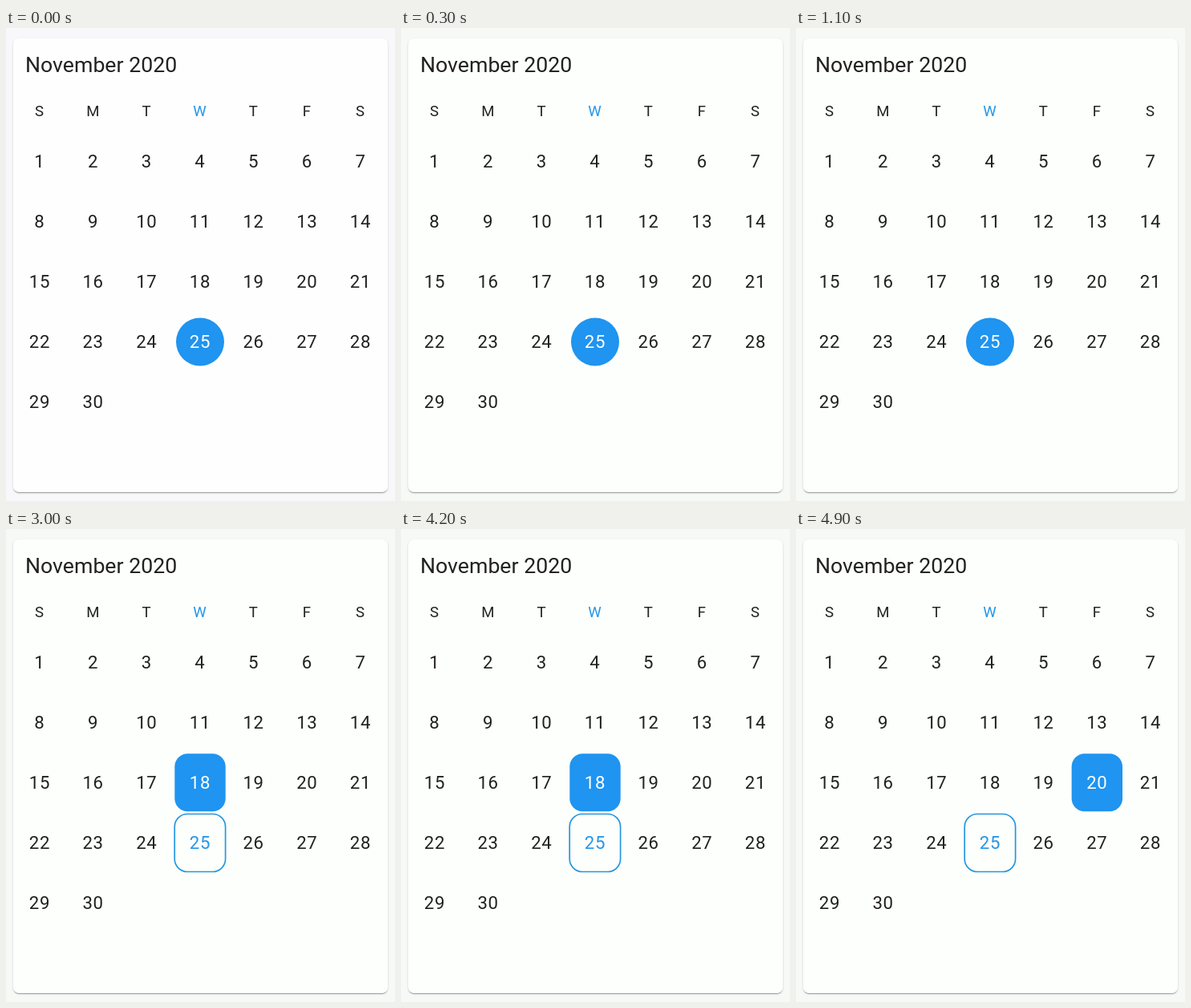
Animation, 485 px wide and 590 px high, one loop 5000 ms. Source, as an HTML page:

```html
<!DOCTYPE html>
<html lang="en">
<head>
<meta charset="utf-8">
<title>Calendar</title>
<style>
  html, body { margin: 0; width: 100%; height: 100%; overflow: hidden; }
  body { background: var(--page); }
  .card {
    position: absolute; left: 9px; top: 12.5px; width: 466.5px; height: 566px;
    border-radius: 7px; background: var(--card);
    box-shadow: 0 2px 1px -1px rgba(0,0,0,.2), 0 1px 1px rgba(0,0,0,.14), 0 1px 3px rgba(0,0,0,.12);
  }
  svg { position: absolute; left: 0; top: 0; }
  text { font-family: Roboto, sans-serif; fill: #212121; }
  .title { font-size: 26.7px; }
  .mid { text-anchor: middle; }
  .week { font-size: 18.6px; }
  .day { font-size: 22.2px; letter-spacing: .6px; }
  .week.now, .day.now { fill: #2496e8; }
  .day.on { fill: #fff; }
  .fill { fill: #1f94f0; }
  .ring { fill: none; stroke: #2496e0; stroke-width: 1.7px; }
</style>
</head>
<body>
<div class="card"></div>
<svg id="view" width="485" height="590" viewBox="0 0 485 590"></svg>
<script>
const LOOP = 5000, TODAY = 25;
const SELECTED = [[0, 25], [3000, 18], [4400, 20]];
const TINTS = [[0, ['#f8f7fa', '#fffeff']], [100, ['#f7f9f7', '#fdfffc']]];

const view = document.getElementById('view');
const colX = c => 41.6 + c * 66.67;
const rowY = r => 166.5 + r * 75;
const cell = day => [colX((day - 1) % 7), rowY(Math.floor((day - 1) / 7))];

function add(tag, attrs, text = '') {
  const el = document.createElementNS(view.namespaceURI, tag);
  for (const key in attrs) el.setAttribute(key, attrs[key]);
  el.textContent = text;
  return view.appendChild(el);
}

const [todayX, todayY] = cell(TODAY);
const disc = add('circle', { class: 'fill', cx: todayX + .4, cy: todayY, r: 30 });
const ring = add('rect', { class: 'ring', x: todayX - 31.4, y: todayY - 36, width: 63.4, height: 72, rx: 16 });
const box = add('rect', { class: 'fill', width: 63.4, height: 72, rx: 16 });

add('text', { class: 'title', x: 24, y: 55 }, 'November 2020');
[...'SMTWTFS'].forEach((name, c) =>
  add('text', { class: 'mid week' + (c === 3 ? ' now' : ''), x: colX(c), y: 110 }, name));

const days = Array.from({ length: 30 }, (_, i) => {
  const [x, y] = cell(i + 1);
  return add('text', { class: 'mid day', x: x + .3, y: y + 7.7 }, i + 1);
});

const at = (steps, t) => steps.filter(s => s[0] <= t).pop()[1];

function draw(now) {
  const t = now % LOOP;
  const picked = at(SELECTED, t);
  const [page, card] = at(TINTS, t);
  const style = document.documentElement.style;
  style.setProperty('--page', page);
  style.setProperty('--card', card);

  const isToday = picked === TODAY;
  disc.style.display = isToday ? '' : 'none';
  ring.style.display = box.style.display = isToday ? 'none' : '';
  const [x, y] = cell(picked);
  box.setAttribute('x', x - 31.3);
  box.setAttribute('y', y - 36.2);

  days.forEach((el, i) => {
    el.classList.toggle('on', i + 1 === picked);
    el.classList.toggle('now', i + 1 === TODAY && !isToday);
  });
}

function tick() {
  draw(performance.now());
  requestAnimationFrame(tick);
}
tick();
</script>
</body>
</html>
```
